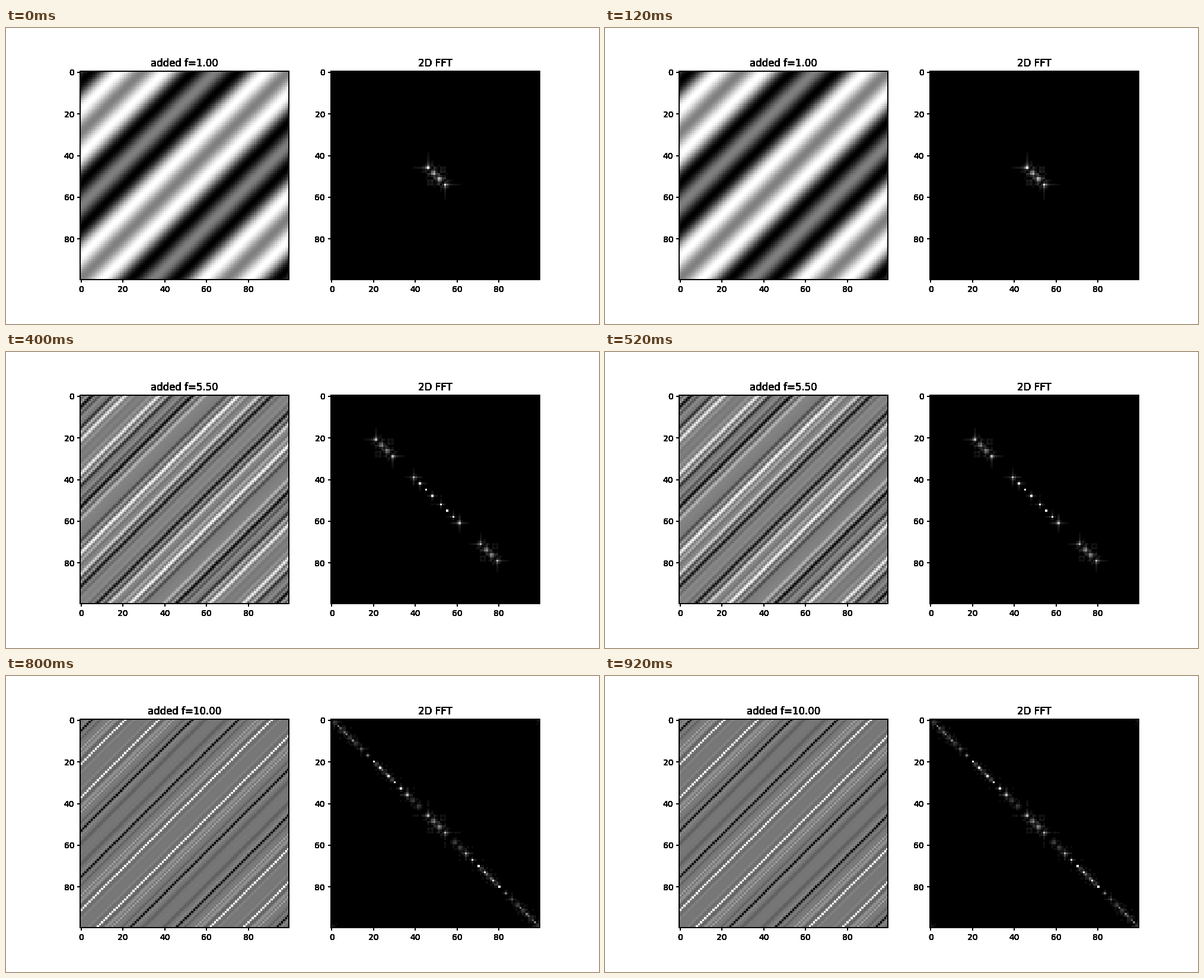
A matplotlib script for the animation above (1 s loop, 1000 by 500 pixels).

```python
import numpy as np
import matplotlib.pyplot as plt
from matplotlib.animation import FuncAnimation

plt.rcParams.update({
    "font.family": "DejaVu Sans", "font.size": 10,
    "axes.linewidth": 1.44, "xtick.major.width": 1.44, "ytick.major.width": 1.44,
})

N = 100
FREQS = np.linspace(1, 10, 5)
LAYERS = 12  # stacked decorations give the heavy, crisp text
FLOOR = 0.05  # weaker parts of the spectrum stay black

axis = np.linspace(-2, 2, N)
x, y = np.meshgrid(axis, axis)
u = (x + y) / np.sqrt(2)


def wave(f):
    return np.sin(2 * np.pi * f * u)


def product(i):
    """Base wave multiplied by every wave up to the i-th frequency."""
    out = wave(0.5)
    for f in FREQS[:i + 1]:
        out = out * wave(f)
    return out


def spectrum(img):
    mag = np.abs(np.fft.fftshift(np.fft.fft2(img)))
    return np.where(mag < FLOOR * mag.max(), 0, mag)


fig = plt.figure(figsize=(10, 5), dpi=100, facecolor="white")
fig.subplots_adjust(left=0.125, right=0.9, bottom=0.102, top=0.902, wspace=0.2)


def panel(col, title):
    """Image plus a stack of identical frames, ticks and titles."""
    ax = fig.add_subplot(1, 2, col)
    im = ax.imshow(np.zeros((N, N)), cmap="gray", interpolation="nearest")
    titles = [ax.set_title(title)]
    for _ in range(LAYERS - 1):
        top = fig.add_subplot(1, 2, col, facecolor="none")
        top.set(xlim=ax.get_xlim(), ylim=ax.get_ylim(), aspect="equal",
                xticks=range(0, N, 20), yticks=range(0, N, 20))
        titles.append(top.set_title(title))
    return im, titles


wave_im, wave_titles = panel(1, "added f=1.00")
fft_im, _ = panel(2, "2D FFT")


def update(i):
    img = product(i)
    for im, data in ((wave_im, img), (fft_im, spectrum(img))):
        im.set_data(data)
        im.autoscale()
    for t in wave_titles:
        t.set_text(f"added f={FREQS[i]:.2f}")
    return []


anim = FuncAnimation(fig, update, frames=len(FREQS), interval=200,
                     repeat=True, repeat_delay=0, blit=False)
plt.show()
```
